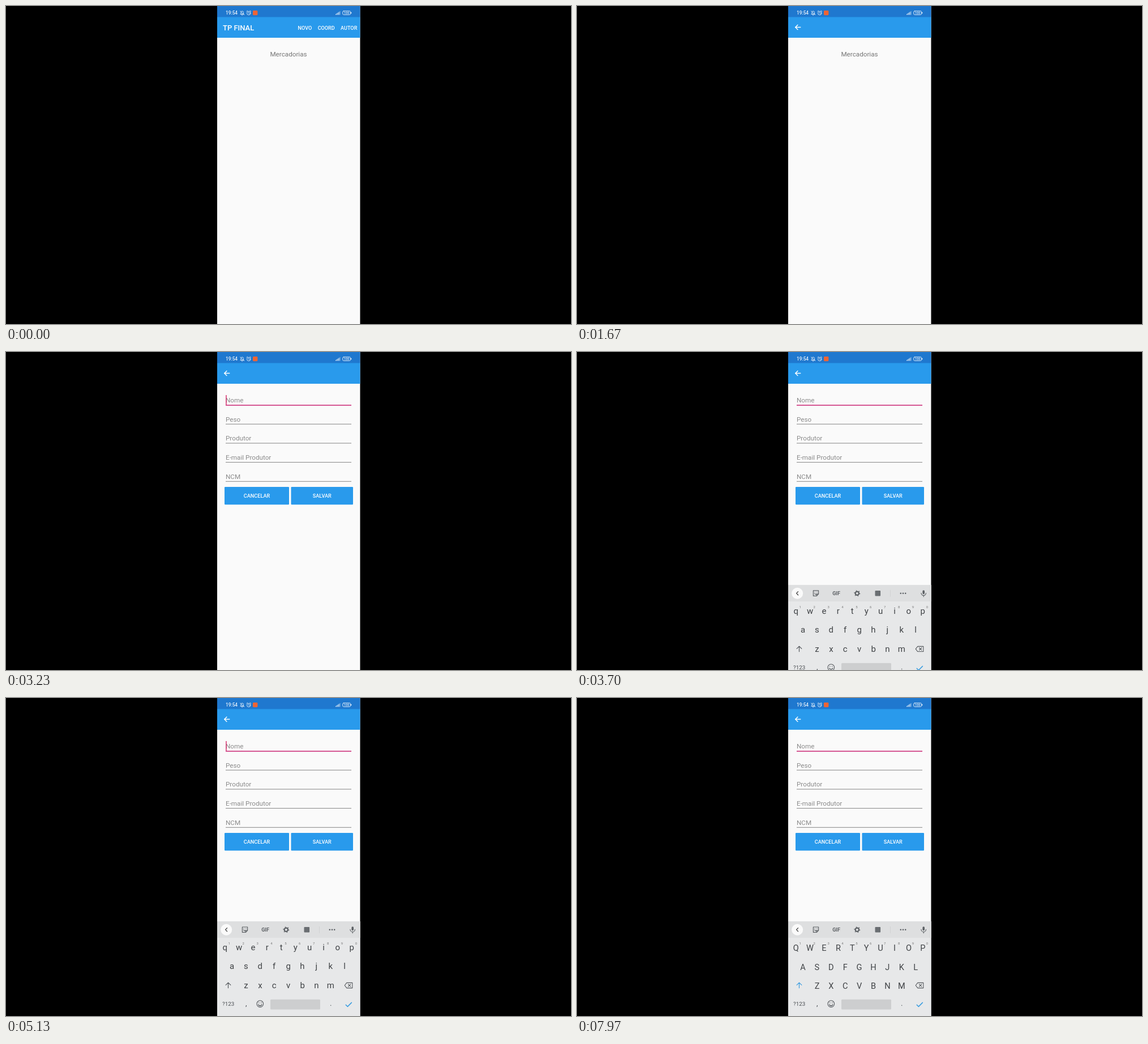
These frames come from a looping animation (998 px wide and 561 px high, 8 s). An HTML page:

```html
<!DOCTYPE html>
<html lang="pt">
<head>
<meta charset="utf-8">
<style>
html, body { margin: 0; width: 100%; height: 100%; overflow: hidden; background: #000; }
svg { display: block; width: 100vw; height: 100vh; }
text { font-family: Roboto, "Open Sans", sans-serif; }
.mid { text-anchor: middle; }
.bold { font-weight: 500; }
.line { fill: none; stroke-linecap: round; stroke-linejoin: round; }
</style>
</head>
<body>
<svg viewBox="0 0 998 561">
  <defs><clipPath id="phone"><rect x="373" width="252.5" height="561"/></clipPath></defs>
  <rect width="998" height="561"/>
  <g clip-path="url(#phone)">
    <rect x="373" width="253" height="561" fill="#fafafa"/>

    <g id="list">
      <text class="mid" x="499" y="89" font-size="11.7" fill="#757575">Mercadorias</text>
    </g>
    <g id="form"></g>

    <rect x="373" width="253" height="20" fill="#1f78cf"/>
    <rect x="373" y="19.5" width="253" height="36.5" fill="#299aec"/>

    <g id="status" fill="#e8f1fa" stroke="none">
      <text class="bold" x="388" y="15" font-size="8.3">19:54</text>
      <g class="line" stroke="#d5e6f7" stroke-width="1">
        <path d="M414 14.5h6.2M415 14v-2.4a2.2 2.6 0 0 1 4.4 0v2.4M416.3 16h1.6M413.6 9l7 6.6"/>
        <circle cx="428.8" cy="12.6" r="3.2"/>
        <path d="M428.8 11v1.8l1.2.7M425 9.6l1.6-1.3M432.6 9.6l-1.6-1.3"/>
      </g>
      <rect x="436" y="8" width="8.4" height="8.2" rx="1.4" fill="#ee6535"/>
      <g id="signal"></g>
      <rect class="line" x="594.8" y="8.8" width="13.6" height="6.6" rx="1.8" stroke="#dcebf9"/>
      <rect x="609" y="10.8" width="1.2" height="2.6"/>
      <text class="mid bold" x="601.6" y="14.2" font-size="5.6">100</text>
    </g>

    <g id="menu" class="bold" fill="#fff" font-size="9.1">
      <text x="383" y="43" font-size="13">TP FINAL</text>
      <text class="mid" x="528" y="41.5">NOVO</text>
      <text class="mid" x="565.7" y="41.5">COORD</text>
      <text class="mid" x="605.7" y="41.5">AUTOR</text>
    </g>
    <path id="back" d="M395.3 37.5h-9.4M390.3 32.9l-4.6 4.6 4.6 4.6" fill="none" stroke="#fff" stroke-width="1.4"/>

    <g id="keyboard">
      <rect x="373" y="394" width="253" height="168" fill="#e7e8e9"/>
      <rect x="373" y="394" width="253" height="29" fill="#dedfe0"/>
      <circle cx="389.2" cy="408.8" r="10" fill="#fafafa"/>
      <g class="line" stroke="#5d6165" stroke-width="1.2">
        <path d="M390.6 405.6l-3 3.1 3 3.1" stroke="#333"/>
        <path d="M417.4 404h9.2v6l-3.2 3.4h-6zM426.6 410h-3.2v3.4M419.6 409.2q1.8 2.4 3.8.6M420 406.6v.2M424 406.6v.2"/>
        <circle cx="494.8" cy="408.8" r="3.2" stroke-width="2.2"/>
        <circle cx="494.8" cy="408.8" r="4.8" stroke-width="1.6" stroke-dasharray="1.3 3.727" stroke-linecap="butt"/>
        <path d="M608 408.4a4.2 4.2 0 0 0 8.4 0M612.2 412.8v2"/>
        <path d="M612.2 405v3.6" stroke-width="3.6"/>
      </g>
      <text class="mid" x="458" y="412" font-size="9" font-weight="700" fill="#5d6165">GIF</text>
      <rect x="526.5" y="404" width="9.6" height="9.6" rx="1" fill="#6a6e72"/>
      <path d="M553.5 403v12" stroke="#d2d3d4"/>
      <g fill="#5d6165">
        <circle cx="571.8" cy="408.8" r="1.3"/><circle cx="576" cy="408.8" r="1.3"/><circle cx="580.2" cy="408.8" r="1.3"/>
      </g>
      <g id="keys" fill="#3f4245"></g>
      <path id="shift" class="line" d="M392.5 511.6v-9.4M388.2 506.4l4.3-4.3 4.3 4.3" stroke-width="1.2"/>
      <g class="line" stroke="#55595d" stroke-width="1.1">
        <path d="M601.8 502.4h10v9.2h-10l-3.6-4.6zM604.4 504.8l4.4 4.4M608.8 504.8l-4.4 4.4"/>
        <circle cx="448.8" cy="539.6" r="5.8"/>
        <path d="M445.6 541q3.2 4 6.4 0M446.8 537.6v.3M450.8 537.6v.3" stroke-width="1.3"/>
      </g>
      <rect x="467" y="531.8" width="88" height="17.6" rx="1.5" fill="#cdcecf"/>
      <g fill="#4b4f53">
        <text class="mid" x="392.6" y="543.3" font-size="9.8">?123</text>
        <text class="mid" x="424.3" y="543" font-size="13">,</text>
        <text class="mid" x="573.8" y="543" font-size="13">.</text>
      </g>
      <path class="line" d="M600.2 541.2l3.2 3.2 7-7" stroke="#3a9de0" stroke-width="1.5"/>
    </g>
  </g>
</svg>
<script>
const NS = "http://www.w3.org/2000/svg";
const $ = id => document.getElementById(id);

function add(parent, tag, attrs, content = "") {
  const el = document.createElementNS(NS, tag);
  for (const k in attrs) el.setAttribute(k, attrs[k]);
  el.textContent = content;
  return parent.appendChild(el);
}

for (let i = 0; i < 5; i++) {
  const h = 1.6 + i * 1.2;
  add($("signal"), "rect", { x: 582 + i * 1.85, y: 15.6 - h, width: 1.2, height: h, opacity: i < 4 ? 0.9 : 0.5 });
}

// Form fields and buttons
const form = $("form");
const lines = ["Nome", "Peso", "Produtor", "E-mail Produtor", "NCM"].map((label, i) => {
  const y = i * 33.7;
  add(form, "text", { x: 388, y: 88.8 + y, "font-size": 11.7, fill: "#8b8b8b" }, label);
  return add(form, "rect", { x: 388, y: 93 + y, width: 222, height: 1, fill: "#858585" });
});
const caret = add(form, "rect", { x: 388.2, y: 76, width: 1.5, height: 17, fill: "#d8336f" });
[["CANCELAR", 386, 114], ["SALVAR", 503.5, 109.5]].forEach(([label, x, w]) => {
  add(form, "rect", { x, y: 238, width: w, height: 31.3, rx: 1.2, fill: "#299aec" });
  add(form, "text", { x: x + w / 2, y: 257.4, class: "mid bold", "font-size": 9.1, fill: "#fff" }, label);
});

// Letter keys, with digit hints above the top row
const keys = [];
["qwertyuiop", "asdfghjkl", "zxcvbnm"].forEach((row, r) => {
  [...row].forEach((char, i) => {
    const x = [386.7, 399, 424][r] + i * 24.9, y = 445 + r * 33.3;
    keys.push({ char, y, el: add($("keys"), "text", { x, y, class: "mid", "font-size": 15 }, char) });
    if (r === 0) {
      add($("keys"), "text", { x: x + 7.6, y: 434.6, class: "mid", "font-size": 6, fill: "#777" }, (i + 1) % 10);
    }
  });
});

const LOOP = 8000, OPEN = 1600, SWAP = 1680, FOCUS = 3100, SLIDE = 3500, CAPS = 7150;
const clamp = v => Math.max(0, Math.min(1, v));
const show = (el, on) => el.setAttribute("visibility", on ? "visible" : "hidden");
let wasUpper = null;

function setCase(upper) {
  if (upper === wasUpper) return;
  wasUpper = upper;
  for (const { char, y, el } of keys) {
    el.textContent = upper ? char.toUpperCase() : char;
    el.setAttribute("y", upper ? y + 1.3 : y);
    el.setAttribute("font-size", upper ? 14.6 : 15);
  }
  $("shift").setAttribute("stroke", upper ? "#3a9de0" : "#55595d");
}

function draw(t) {
  show($("menu"), t < OPEN);
  show($("back"), t >= OPEN);

  const fade = clamp((t - SWAP) / 220);
  $("list").setAttribute("opacity", 1 - fade);
  form.setAttribute("opacity", fade);

  const focused = t >= FOCUS;
  lines[0].setAttribute("fill", focused ? "#cf3c82" : "#858585");
  lines[0].setAttribute("height", focused ? 1.7 : 1);
  show(caret, focused && (t - FOCUS) % 1000 < 500);

  const left = 1 - clamp((t - SLIDE) / 295);
  show($("keyboard"), t >= SLIDE);
  $("keyboard").setAttribute("transform", `translate(0 ${167 * left * left})`);
  setCase(t >= CAPS);
}

const start = performance.now();
function tick() {
  draw((performance.now() - start) % LOOP);
  requestAnimationFrame(tick);
}
tick();
</script>
</body>
</html>
```
